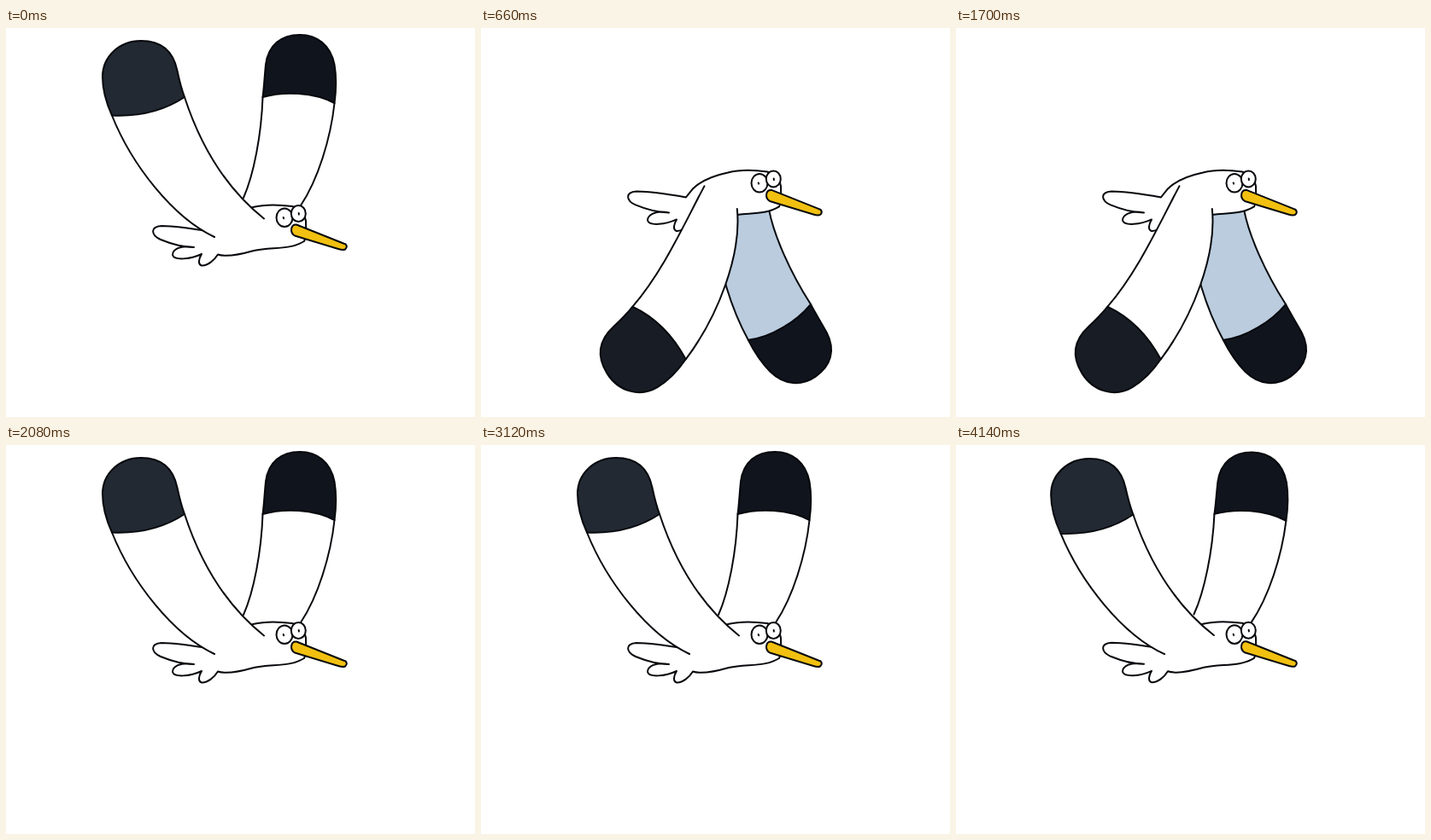
These frames come from a looping animation (549x456 px, 4160 ms). An HTML page:

```html
<!DOCTYPE html>
<html lang="en">
<head>
<meta charset="utf-8">
<title>Flapping seabird</title>
<style>
  html, body { margin: 0; width: 100%; height: 100%; overflow: hidden; background: #fff; }
  svg { display: block; width: 100vw; height: 100vh; }
  .line { fill: none; stroke: #06080c; stroke-width: 2; stroke-linecap: round; stroke-linejoin: round; }
  .white { fill: #fff; }
</style>
</head>
<body>
<svg viewBox="0 0 549 456">
  <g id="bird">
    <g id="farWing">
      <path id="farFill" d="M345 208C365 178 380 130 384.500 88L345 50L300.500 81C299 125 290 172 278 199L290 220L299 238L330 235Z"/>
      <path class="line" style="fill:#10141d" d="M384.500 88C387 70 386.500 55 384.500 43C380 20 364 8 344 8C322 8 307 20 304 43C302.500 58 302 70 300.500 81C325 74 360 75 384.500 88Z"/>
      <path class="line" d="M345 208C365 178 380 130 384.500 88M300.500 81C299 125 290 172 278 199"/>
    </g>

    <path class="line white" style="fill:#fff" d="M240 239C218 235 196 232 182 232C168 233 170 243 181 248C193 253 208 257 220 257C203 254 195 260 195 266C197 273 216 271 229 265C226 270 224 277 229 278.500C236 279 244 272 248 265.500C258 269 276 265 290 261C310 256 331 261 349 250C352 245 351 235 351 226C349 215 343 211 335 209C320 207 303 206.500 289 210C270 214 257 220 248 229Z"/>

    <g id="nearWing">
      <path id="nearFill" class="white"/>
      <path id="nearEdge" class="line"/>
      <path id="nearTip" class="line" d="M124 102.500C116 85 113 72 113 57C113 34 132 15 158 15C182 15 196 28 200.500 50C203 62 206 73 209 81C185 97 155 104 124 102.500Z"/>
    </g>

    <g class="line">
      <ellipse class="white" cx="326" cy="222.300" rx="9.500" ry="10.800"/>
      <ellipse class="white" cx="342.300" cy="217.500" rx="8.500" ry="9.500"/>
      <path d="M324.700 222l.4 1.200M342.700 217l.2 1.600"/>
      <path fill="#f1c010" d="M340 230.500L395 252.500C399 253 400 257 397 259.500C395 260.500 392 260 389 259L338 243.500C332 240 333 230 340 230.500Z"/>
    </g>
  </g>
</svg>
<script>
  const PERIOD = 1040, DOWNSTROKE = 610;
  const $ = id => document.getElementById(id);
  const bird = $('bird'), farWing = $('farWing'), nearWing = $('nearWing');
  const farFill = $('farFill'), nearFill = $('nearFill');
  const nearEdge = $('nearEdge'), nearTip = $('nearTip');

  const ease = p => (1 - Math.cos(Math.PI * p)) / 2;
  const mix = (from, to, k) =>
    `rgb(${from.map((c, i) => Math.round(c + (to[i] - c) * k))})`;

  // 0 = wings raised, 1 = wings fully lowered
  function flap(ms) {
    const t = ms % PERIOD;
    return t < DOWNSTROKE
      ? ease((t / DOWNSTROKE) ** 1.2)
      : 1 - ease((t - DOWNSTROKE) / (PERIOD - DOWNSTROKE));
  }

  // The inner edge tucks in at the shoulder as the wing goes down.
  function shapeNearWing(k) {
    const outer = 'M244 245C195 222 147 160 124 102.5';
    const inner = `209 81C226 133 ${255 + 5 * k} ${186 - 5 * k} ${302 - 16 * k} ${223.5 + 2.5 * k}`;
    nearFill.setAttribute('d', `${outer}L${inner}Z`);
    nearEdge.setAttribute('d', `${outer}M${inner}`);
  }

  function draw(ms) {
    const k = flap(ms);
    bird.setAttribute('transform', `translate(0 ${-42 * k})`);
    nearWing.setAttribute('transform', `rotate(${-125.4 * k} 274 233)`);
    farWing.setAttribute('transform', `rotate(${150.5 * k} 299 236)`);
    shapeNearWing(k);
    farFill.setAttribute('fill', mix([255, 255, 255], [184, 202, 221], k));
    nearTip.style.fill = mix([35, 41, 51], [24, 29, 37], k);
  }

  const start = performance.now();
  function tick() {
    draw(performance.now() - start);
    requestAnimationFrame(tick);
  }
  draw(0);
  requestAnimationFrame(tick);
</script>
</body>
</html>
```
